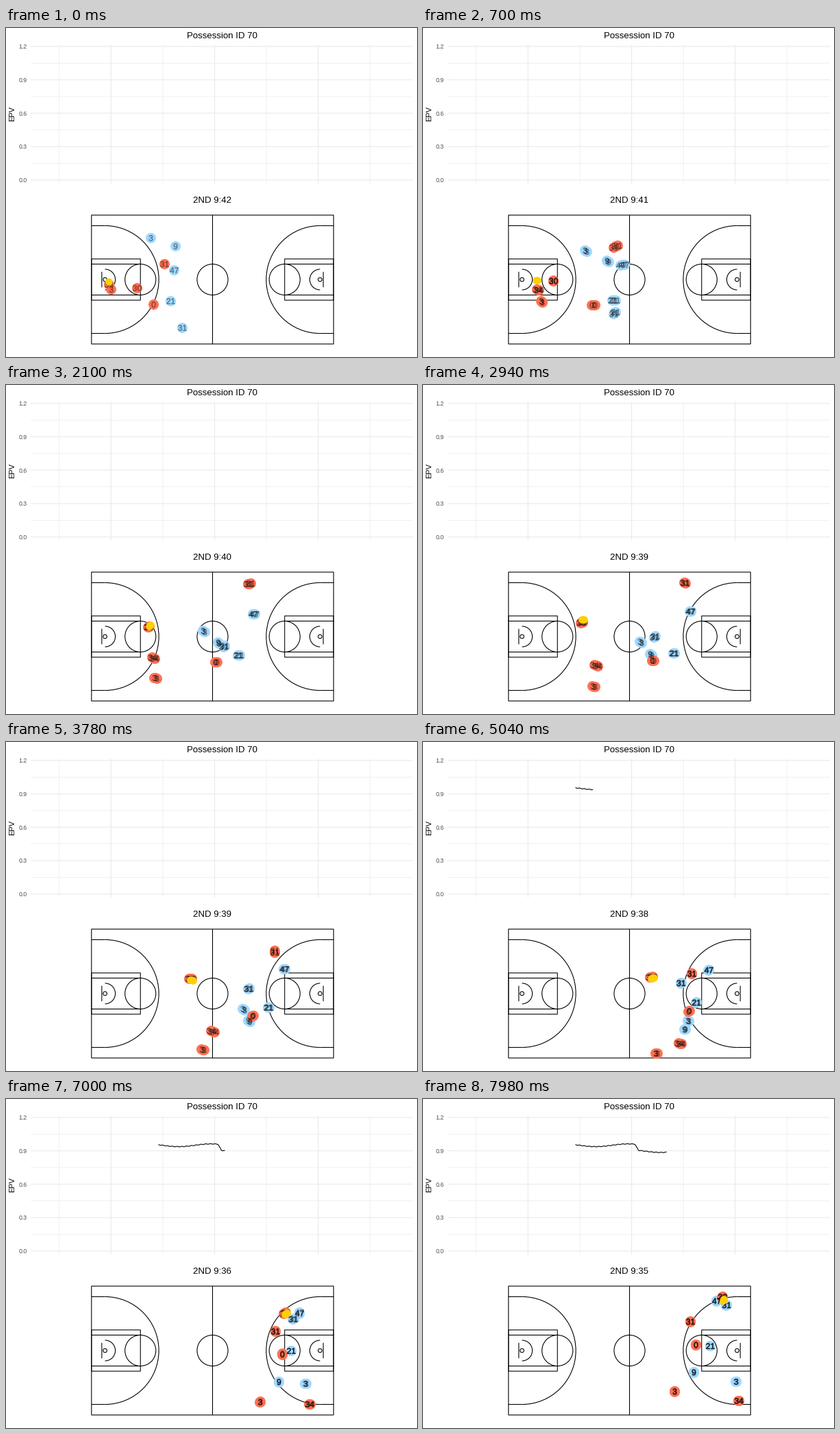
A matplotlib script for the animation above (8 s loop, 600 px wide and 480 px high).

```python
import numpy as np
import matplotlib.pyplot as plt
from matplotlib.animation import FuncAnimation
from matplotlib.collections import LineCollection, PathCollection
from matplotlib.patches import Arc, Circle, Rectangle
from matplotlib.path import Path
from matplotlib.textpath import TextPath
from matplotlib.transforms import Affine2D

W, H, DPI = 600, 480, 100
TICK, STEP, LOOP = 20, 140, 8000
LAST = LOOP // STEP
PX = 72 / DPI
FONT = "Liberation Sans"
BLUE, RED, GOLD = "#a0d8ff", "#ff7256", "#ffd000"

# Evenly timed waypoints of each player
AWAY = {
    "3": [(211, 306), (308, 370), (395, 409), (457, 412)],
    "9": [(247, 318), (325, 388), (386, 420), (395, 398)],
    "47": [(245, 353), (382, 331), (419, 331), (428, 294)],
    "21": [(240, 398), (358, 392), (402, 378), (419, 360)],
    "31": [(257, 437), (332, 371), (382, 348), (443, 300)],
}
HOME = {
    "31": [(231, 344), (375, 287), (392, 341), (390, 324)],
    "0": [(215, 403), (326, 403), (392, 390), (398, 358)],
    "30": [(191, 379), (222, 348), (345, 340), (437, 288)],
    "34": [(150, 374), (239, 405), (388, 442), (461, 440)],
    "3": [(153, 381), (238, 436), (348, 454), (367, 426)],
}
labels = [*AWAY, *HOME]
n_away = len(AWAY)
handler = n_away + list(HOME).index("30")
points = np.array([*AWAY.values(), *HOME.values()], float)
slopes = np.gradient(points, axis=1, edge_order=2)


def players(step):
    """Positions on smooth curves through the waypoints."""
    spans = points.shape[1] - 1
    u = np.clip(step / LAST, 0, 1) * spans
    i = min(int(u), spans - 1)
    u -= i
    a = u * u * (3 - 2 * u)
    return ((1 - a) * points[:, i] + a * points[:, i + 1]
            + u * (1 - u) * ((1 - u) * slopes[:, i] - u * slopes[:, i + 1]))


def ball_offset(step):
    """The handler collects the ball, then dribbles it from side to side."""
    loose = max(0, 1 - step / 13)
    sway = 5 * np.cos(2 * np.pi * (step - 31.5) / 24)
    return np.array([2 - 43 * loose, sway - 7 * loose])


def epv_line(step):
    """Slow swell with a ripple, and one sudden drop in value."""
    x = np.arange(223, 227.3 + 5.12 * (step - 32), 0.5)
    swell = 2 * np.cos(2 * np.pi * (x - 252) / 95)
    drop = 8.5 * np.clip((x - 309.5) / 5, 0, 1)
    return x, 67.5 + swell + drop + 0.4 * np.sin(0.9 * x)


fig = plt.figure(figsize=(W / DPI, H / DPI), dpi=DPI, facecolor="white")
ax = fig.add_axes([0, 0, 1, 1])
ax.set(xlim=(0, W), ylim=(H, 0))
ax.axis("off")
pixel = Affine2D().scale(1 / DPI) + fig.dpi_scale_trans


def segments(segs, color, width, z):
    ax.add_collection(LineCollection(segs, colors=color, linewidths=width * PX,
                                     zorder=z, snap=False), autolim=False)


def text(x, y, s, size, color="black", **kw):
    return ax.text(x, y, s, fontsize=size * PX, family=FONT, color=color, **kw)


def stamps(path, color, z, alpha=1, edge=0):
    c = PathCollection([path], offsets=np.zeros((1, 2)),
                       offset_transform=ax.transData, transform=pixel,
                       facecolors=color, edgecolors=color,
                       linewidths=edge * PX, alpha=alpha, zorder=z, snap=False)
    return ax.add_collection(c, autolim=False)


def number(s):
    path = TextPath((0, 0), s, size=12, prop=FONT)
    box = path.get_extents()
    return path.transformed(Affine2D().translate(
        -(box.x0 + box.x1) / 2, -(box.y0 + box.y1) / 2))


def draw_chart():
    left, right, top, bottom = 36, 594, 24.5, 226.5
    base, dy = 221.7, 48.7

    def grid(xs, ys, width):
        segments([[(x, top), (x, bottom)] for x in xs]
                 + [[(left, y), (right, y)] for y in ys], "#ebebeb", width, 1)

    grid(77.7 + 151.2 * np.arange(4), base - dy * (np.arange(4) + 0.5), 0.7)
    grid(153.3 + 151.2 * np.arange(3), base - dy * np.arange(5), 1.2)
    for k in range(5):
        text(30.7, base - dy * k + 3.2, f"{0.3 * k:.1f}", 8.8, "#4d4d4d",
             ha="right")
    text(9.5, 125, "EPV", 11, rotation=90, ha="center", va="center")
    text(315, 15, "Possession ID 70", 13.2, ha="center")


def draw_court():
    x0, x1, y0, y1 = 124.8, 478.2, 273, 461
    cx, cy = (x0 + x1) / 2, (y0 + y1) / 2
    ft = (x1 - x0) / 94
    arc_r = 20.9 * ft
    style = dict(fill=False, lw=1.1 * PX, ec="black", zorder=2, snap=False)
    lines = [[(cx, y0), (cx, y1)]]

    ax.add_patch(Rectangle((x0, y0), x1 - x0, y1 - y0, **style))
    ax.add_patch(Circle((cx, cy), 6 * ft, **style))
    for base, d in ((x0, 1), (x1, -1)):
        foul, hoop, board = (base + d * f * ft for f in (19, 5.25, 4))
        ax.add_patch(Rectangle((min(base, foul), cy - 8 * ft),
                               19 * ft, 16 * ft, **style))
        ax.add_patch(Circle((foul, cy), 6 * ft, **style))
        ax.add_patch(Circle((hoop, cy), 0.75 * ft, **style))
        start = -90 * d
        for r in (4 * ft, arc_r):
            ax.add_patch(Arc((hoop, cy), 2 * r, 2 * r, theta1=start,
                             theta2=start + 180, **style))
        lines.append([(board, cy - 3 * ft), (board, cy + 3 * ft)])
        for s in (-1, 1):
            lines.append([(base, cy + s * 6 * ft), (foul, cy + s * 6 * ft)])
            lines.append([(base, cy + s * arc_r), (hoop, cy + s * arc_r)])
    segments(lines, "black", 1.1, 2)


draw_chart()
draw_court()
clock = text(301, 255, "", 13.2, ha="center")
curve, = ax.plot([], [], color="black", lw=1.1 * PX, zorder=3, snap=False)
disc = Path.unit_circle()
big = disc.transformed(Affine2D().scale(7.5))
away = stamps(big, BLUE, 4)
home = stamps(big, RED, 5)
numbers = [stamps(number(s), "black", 6, alpha=0.42, edge=0.35)
           for s in labels]
ball = stamps(disc.transformed(Affine2D().scale(5.3)), GOLD, 7)


def update(k):
    step = k * TICK // STEP
    # Each step after the first overlays three tracking samples
    times = step + np.array([-1, 0, 1]) / 3 if step else np.zeros(1)
    pos = np.stack([players(t) for t in times], axis=1)
    away.set_offsets(pos[:n_away].reshape(-1, 2))
    home.set_offsets(pos[n_away:].reshape(-1, 2))
    for label, p in zip(numbers, pos):
        label.set_offsets(p)
    ball.set_offsets(pos[handler] + [ball_offset(t) for t in times])

    seconds = 41 - int(np.floor((step - 4.9) / 7.8))
    clock.set_text(f"2ND 9:{seconds}")
    curve.set_data(*epv_line(step))
    return [away, home, *numbers, ball, clock, curve]


anim = FuncAnimation(fig, update, frames=LOOP // TICK, interval=TICK,
                     repeat=True, repeat_delay=0, blit=False)
plt.show()
```
